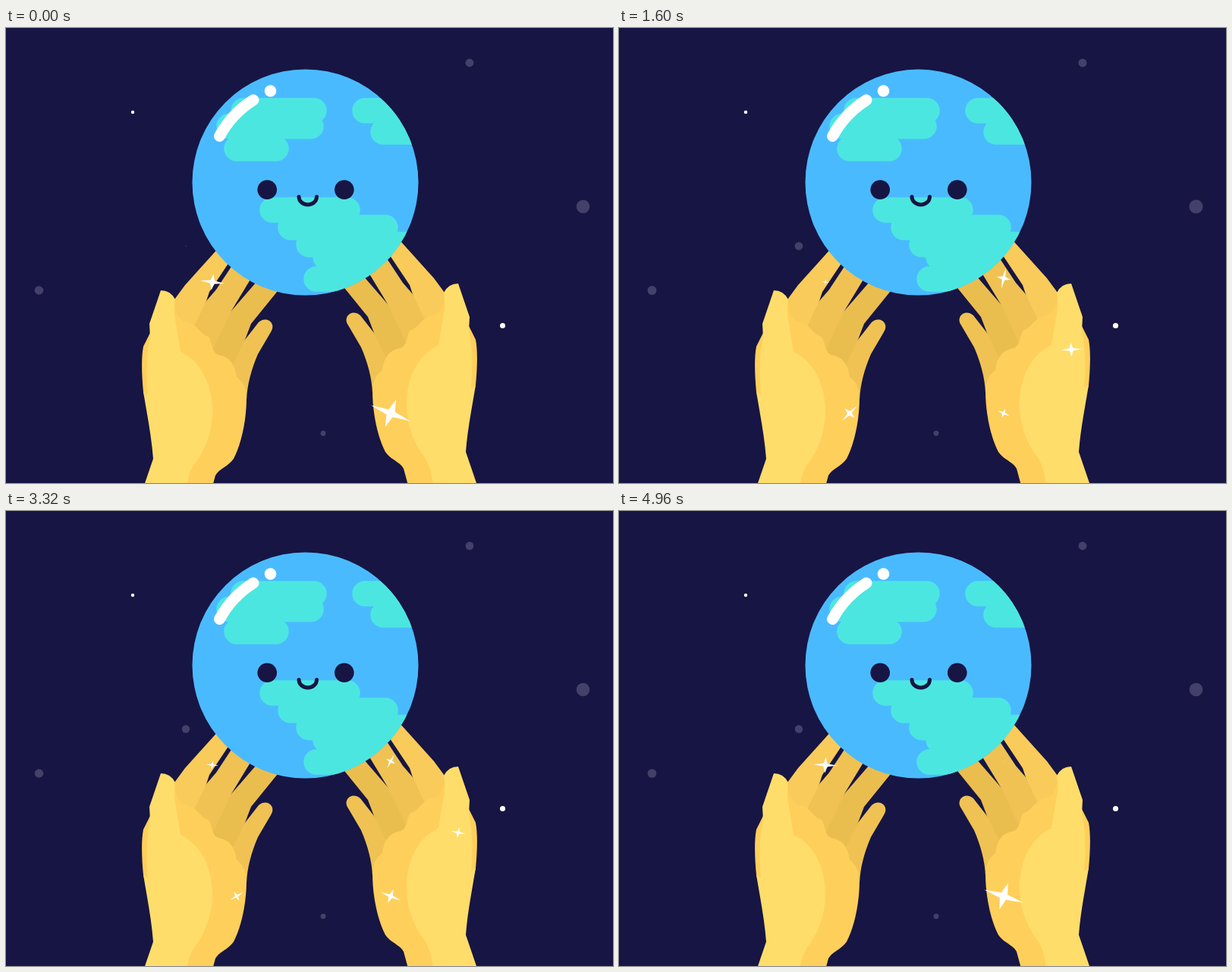
An HTML page that plays this animation: 800 px wide and 600 px high, repeating every 5000 ms.

```html
<!DOCTYPE html>
<html lang="en">
<head>
<meta charset="utf-8">
<style>
  html, body { margin: 0; width: 100%; height: 100%; overflow: hidden; background: #171543; }
  svg { display: block; width: 100vw; height: 100vh; }
  .round { fill: none; stroke-linecap: round; }
</style>
</head>
<body>
<svg viewBox="0 0 800 600">
  <defs>
    <clipPath id="disc"><circle cx="394.5" cy="203.5" r="149"/></clipPath>
    <path id="sparkle" d="M1 0L.16 .13 0 .68-.16 .13-1 0-.16-.13 0-.68 .16-.13Z"/>
    <g id="hand">
      <path fill="#f8cb5a" d="M222 358L236 339 290 279 304 294 268 348 264 360 254 400 222 395Z"/>
      <path fill="#efc253" d="M264 360L277 345 308 298 340 302 297 373 288 445 245 400Z"/>
      <path fill="#eabd4f" d="M297 373L336 328 370 332 323 390 315 411 304 456 270 430Z"/>
      <path fill="#efc253" d="M315 411L333 388C343 379 357 389 349 401L332 430C323 451 318 470 317 490L296 450Z"/>
      <path fill="#ffcf5b" d="M222 356Q222 387 242 389C252 392 256 404 266 407 272 410 270 428 280 431 296 434 302 445 304 460 316 470 317 480 317 487 317 520 309 551 300 568 292 579 281 581 276 590L270 612H220L181 480C179 460 178 435 181 420L190 402Z"/>
      <path fill="#ffdd6a" d="M204 346Q217 346 223 358 220 376 224 390L230 427C257 440 272 470 272 506 272 536 259 562 249 574Q240 586 237 612H179L194 568C192 540 186 510 181 480L187 484C185 455 185 430 190 408L189 390Z"/>
    </g>
  </defs>
  <rect width="800" height="600" fill="#171543"/>
  <g id="stars" fill="#434069">
    <circle cx="611" cy="46" r="5.4"/>
    <circle cx="760.5" cy="235.5" r="8.8"/>
    <circle cx="237" cy="287.5" r="5.2" id="appearing"/>
    <circle cx="43.5" cy="346" r="5.8"/>
    <circle cx="418" cy="534.5" r="3.4"/>
    <circle cx="167" cy="111" r="2.2" fill="#fff"/>
    <circle cx="654.5" cy="392.5" r="3.5" fill="#fff"/>
  </g>
  <use href="#hand"/>
  <use href="#hand" transform="matrix(-1 0 0 1 800 -9)"/>
  <g id="globe">
    <g clip-path="url(#disc)">
      <rect x="240" y="50" width="310" height="310" fill="#4abaff"/>
      <path class="round" stroke="#4ce6e0" stroke-width="33.5" d="M313 109h93M294 129.5h108M304 159h52M473 109h80M497 137h60M351 240h99M375 263h125M399 285.5h140M421 302h120M409 331h90"/>
    </g>
    <g fill="#171543"><circle cx="344.2" cy="213.2" r="12.8"/><circle cx="445.8" cy="213.2" r="12.8"/></g>
    <path class="round" stroke="#171543" stroke-width="5" d="M386 222.5a11.75 10.5 0 0 0 23.5 0"/>
    <circle cx="348.5" cy="83" r="7.8" fill="#fff"/>
    <path class="round" stroke="#fff" stroke-width="15" d="M281.5 142.5A128 128 0 0 1 326 95"/>
  </g>
  <g id="sparkles" fill="#fff">
    <g transform="translate(272 335) rotate(-15) scale(16)"><use href="#sparkle" class="main"/></g>
    <g transform="translate(507 508) scale(28)"><use href="#sparkle" class="main"/></g>
    <g transform="translate(304 508) rotate(-52) scale(15.5)"><use href="#sparkle"/></g>
    <g transform="translate(507 330) rotate(-84) scale(15.5)"><use href="#sparkle"/></g>
    <g transform="translate(596 424) rotate(-10) scale(15.5)"><use href="#sparkle"/></g>
  </g>
</svg>
<script>
const LOOP = 5000, FPS = 24, FRAMES = 120;
const globe = document.getElementById('globe');
const stars = [...document.querySelectorAll('#stars circle')]
  .map(el => ({ el, r: +el.getAttribute('r') }));
const sparkles = document.querySelectorAll('#sparkles use');

// Two unequal swells per loop: [frame, level]
const SWELL = [[0, 0], [23, .36], [41, 1], [57, .2], [98, 1], [FRAMES, 0]];

function level(f) {
  const i = SWELL.findIndex(key => key[0] > f);
  const [[f0, v0], [f1, v1]] = SWELL.slice(i - 1, i + 1);
  return v0 + (v1 - v0) * (f - f0) / (f1 - f0);
}

function draw(now) {
  const f = Math.floor((now % LOOP) / 1000 * FPS + .46) % FRAMES;

  // Three bounces, slowest at the low point
  const fromLow = Math.abs(f % 40 - 20) / 20;
  globe.setAttribute('transform', `translate(0 ${8.6 * (1 - fromLow) ** 2.2})`);

  const pulse = 1 + .28 * Math.sin(Math.PI * f / 20) ** 2;
  for (const { el, r } of stars) {
    const grow = el.id === 'appearing' ? Math.min(1, .14 + f / 10) : 1;
    el.setAttribute('r', r * pulse * grow);
  }

  // Main sparkles shrink while the others grow
  const small = level(f), main = 1 - .75 * small;
  const smallTurn = 62 * (1 - small);
  const mainTurn = 22 + 48 * Math.sin(Math.PI * Math.max(0, f - 40) / 40);
  for (const el of sparkles) {
    const [size, turn] = el.matches('.main') ? [main, mainTurn] : [small, smallTurn];
    el.setAttribute('transform', `rotate(${turn}) scale(${size})`);
  }
}

const start = performance.now();
function tick() {
  draw(performance.now() - start);
  requestAnimationFrame(tick);
}
tick();
</script>
</body>
</html>
```
